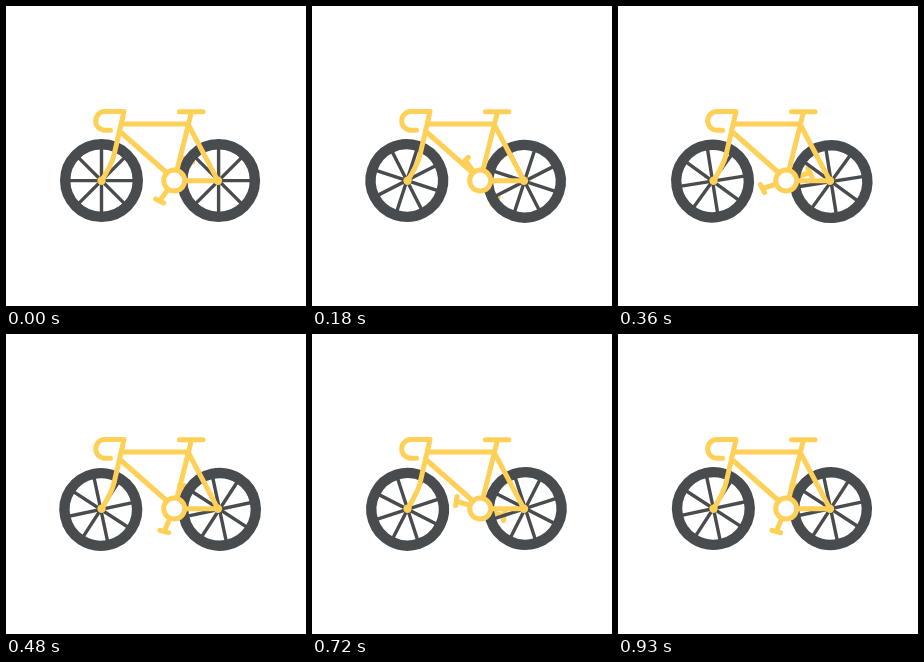
Write an HTML page that moves like this. It is 300 px wide and 300 px high and loops after 0.96 s.

```html
<!DOCTYPE html>
<html lang="en">
<head>
<meta charset="utf-8">
<title>Bicycle</title>
<style>
  html, body { margin: 0; width: 100%; height: 100%; overflow: hidden; background: #fff; }
  svg { display: block; width: 100vw; height: 100vh; }
</style>
</head>
<body>
<svg viewBox="0 0 300 300" fill="none" stroke-linecap="round" stroke-linejoin="round">
  <defs>
    <g id="pedal"><path d="M0 0V25"/><path d="M-4.5 25H4.5" transform="rotate(-9 0 25)"/></g>
    <path id="spokes" d="M-35 0H35M0 -35V35"/>
    <g id="wheel" stroke="#494c4f">
      <circle r="36.3" stroke-width="10.4"/>
      <g stroke-width="3.4"><use href="#spokes"/><use href="#spokes" transform="rotate(45)"/></g>
    </g>
  </defs>
  <g id="crank" stroke="#ffd058" stroke-width="5">
    <use href="#pedal"/><use href="#pedal" transform="rotate(180)"/>
  </g>
  <use id="front" href="#wheel"/>
  <use id="rear" href="#wheel"/>
  <g stroke="#ffd058" stroke-width="5">
    <path d="M104.5 124.2H99a9.3 9.3 0 0 1 0-18.6H118L108 149Q106 158 95.5 174.8"/>
    <path d="M116 118H181M114.5 126L161 167M173.5 105.8H197M185.5 106L171 164M182 118L212 174.8H180"/>
    <circle cx="168.2" cy="174.6" r="10.5" fill="#fff"/>
    <g fill="#ffd058" stroke="none"><circle cx="95.5" cy="174.8" r="4.2"/><circle cx="212" cy="174.8" r="4.2"/></g>
  </g>
</svg>
<script>
  const STEP = 30, STEPS = 32, DEGREES = 12;
  const crank = document.getElementById('crank');
  const front = document.getElementById('front');
  const rear = document.getElementById('rear');

  // x, y is the pivot; dx, dy the slight eccentricity of the part around it
  function spin(part, x, y, angle, dx = 0, dy = 0) {
    part.setAttribute('transform', `translate(${x} ${y}) rotate(${-angle}) translate(${dx} ${dy})`);
  }

  function draw(time) {
    const turn = Math.floor(time / STEP) % STEPS * DEGREES;
    spin(crank, 168.2, 174.6, turn - 35.5);
    spin(front, 95.1, 175, turn, 0.4, -0.4);
    spin(rear, 213, 175, turn, -0.4, -0.4);
  }

  const start = performance.now();
  (function tick() {
    draw(performance.now() - start);
    requestAnimationFrame(tick);
  })();
</script>
</body>
</html>
```
